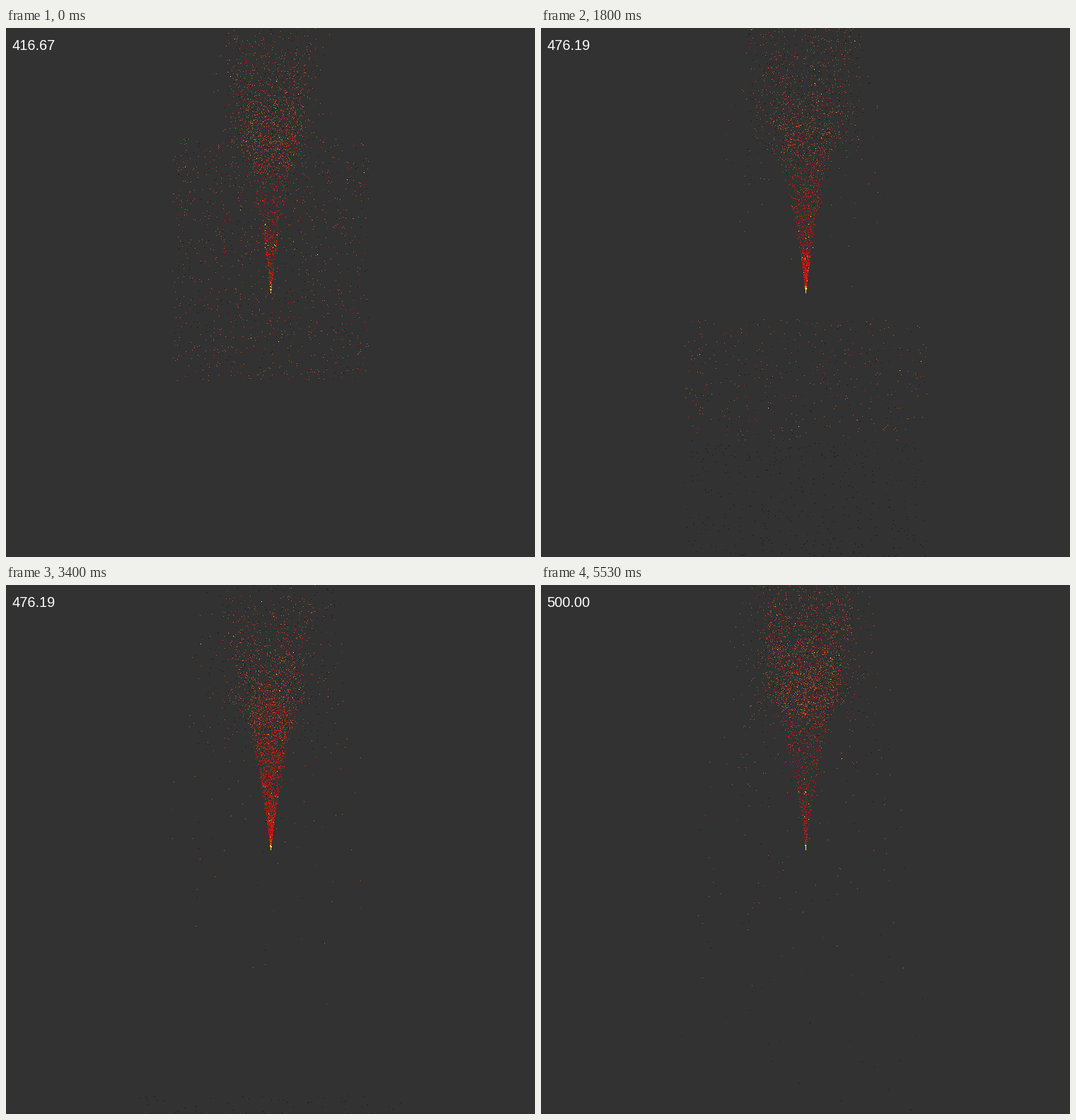
A matplotlib script that plays this animation: 748 by 748 pixels, repeating every 5.59 s.

```python
import matplotlib.pyplot as plt
import numpy as np
from matplotlib.animation import FuncAnimation

SIZE, DPI = 748, 100
LOOP, TICK = 5590, 26          # ms
TICKS, STEPS = LOOP // TICK, 84
BG = (50, 50, 50)
CENTER, GRAVITY = SIZE / 2, 36.0
START = -7.7                   # when the whole pool was first fired, in s
GENERATIONS = 6

YELLOW, RED, ORANGE, GREY, DARK = range(5)
PALETTE = np.array([(255, 240, 50), (236, 18, 4), (220, 88, 22),
                    (122, 114, 92), (22, 18, 18)], np.uint8)
HUE_MIX = [.01, .27, .46, .10, .16]

rng = np.random.default_rng(11)


def fire(birth, base_life, stray):
    """One flight for every particle; a few strays outlive their usual span."""
    n = len(birth)
    vx = rng.uniform(-18.05, 18.05, n)
    vy = rng.uniform(-167, -122.5, n)
    fall = (np.sqrt(vy ** 2 + 2 * GRAVITY * (SIZE - CENTER)) - vy) / GRAVITY
    extra = (rng.random(n) < stray) * rng.uniform(0, 8, n)
    life = np.minimum(base_life + extra, fall)
    hue = rng.choice(len(HUE_MIX), n, p=HUE_MIX)
    turn = rng.uniform(0.9, 2.2, n)
    spark = rng.random(n) < 0.05
    return birth, life, vx, vy, hue, turn, spark


# Each particle is fired again as soon as it burns out or drops off the stage
base_life = np.r_[rng.uniform(2.7, 6, 2050), rng.uniform(7, 17, 1400)]
birth = np.full(len(base_life), START)
flights = []
for gen in range(GENERATIONS):
    flights.append(fire(birth, base_life, 0.16 if gen else 0))
    birth = birth + flights[-1][1]
birth, life, vx, vy, hue, turn, spark = map(np.concatenate, zip(*flights))


def render(step):
    age = step * LOOP / STEPS / 1000 - birth
    x = np.rint(CENTER + vx * age).astype(int)
    y = np.rint(CENTER + vy * age + GRAVITY / 2 * age ** 2).astype(int)
    seen = ((age >= 0) & (age < life)
            & (x >= 0) & (x < SIZE) & (y >= 0) & (y < SIZE))
    tone = np.where(age < turn, RED, hue)
    tone[(age > 4) & (life - age < 0.8)] = DARK
    tone[(age < 0.05) | (spark & (age < 0.8))] = YELLOW
    img = np.empty((SIZE, SIZE, 3), np.uint8)
    img[:] = BG
    img[y[seen], x[seen]] = PALETTE[tone[seen]]
    return img


# Frame-rate readout, refreshed about twice a second from the frame cost in ms
COSTS = [2.4, 2, 2.2, 2, 2.1, 2.2, 2.3, 2.1, 2, 2.3, 2.2, 2.1, 2]


def readout(step):
    return f"{1000 / COSTS[(step + 2) // 7]:.2f}"


fig = plt.figure(figsize=(SIZE / DPI, SIZE / DPI), dpi=DPI,
                 facecolor=np.array(BG) / 255)
ax = fig.add_axes([0, 0, 1, 1])
ax.axis("off")
picture = ax.imshow(render(0), extent=(0, SIZE, SIZE, 0),
                    interpolation="nearest", aspect="auto")
label = ax.text(8.5, 31, readout(0), color="white", family="Liberation Sans",
                fontsize=20 * 72 / DPI, va="baseline", ha="left")


def update(i):
    step = int((i + 0.5) * STEPS / TICKS)
    picture.set_data(render(step))
    label.set_text(readout(step))
    return picture, label


anim = FuncAnimation(fig, update, frames=TICKS, interval=TICK,
                     repeat=True, repeat_delay=0, blit=False)
plt.show()
```
